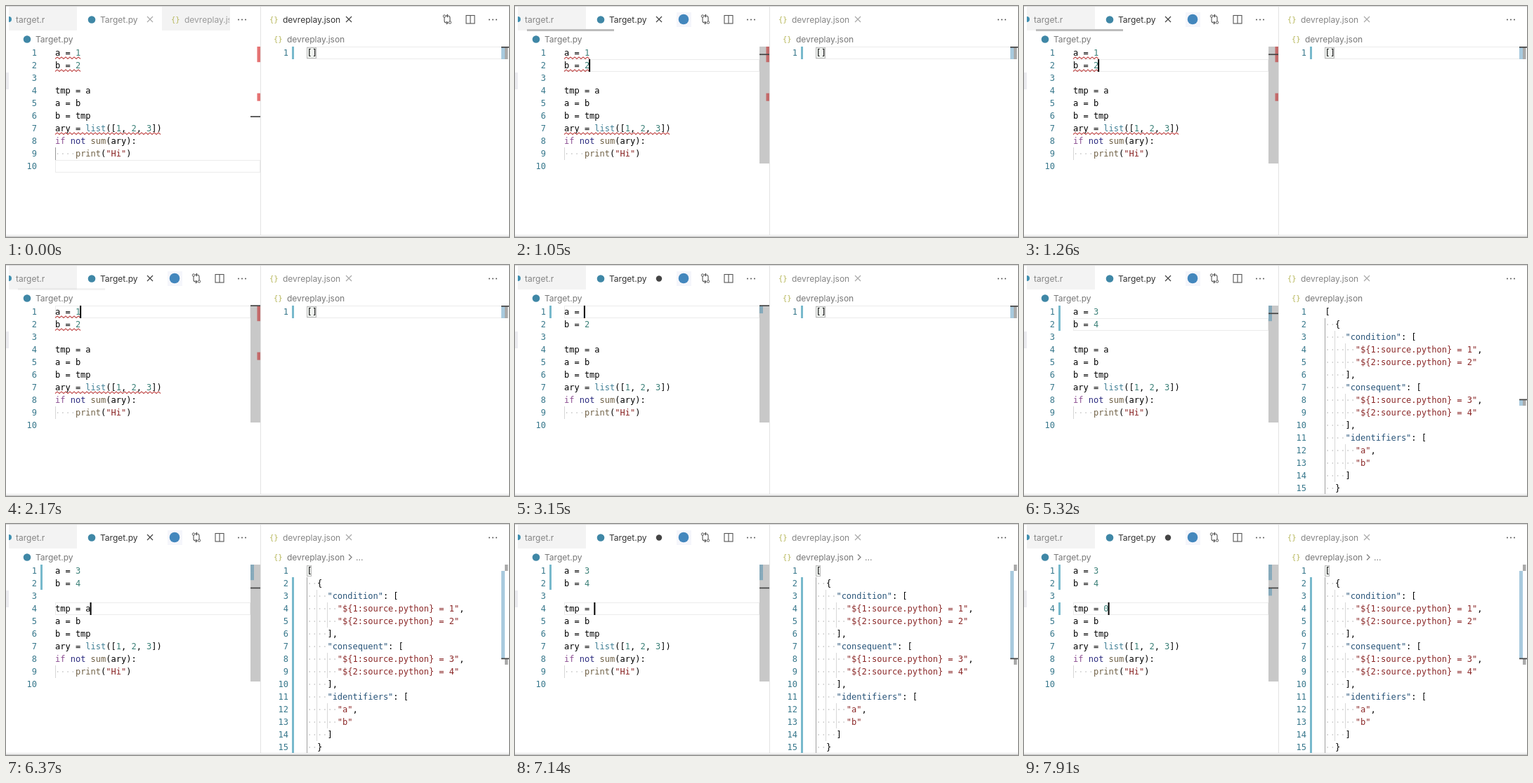
Write an HTML page that moves like this. It is 716 by 330 pixels and loops after 8 s.

```html
<!DOCTYPE html>
<html lang="en">
<head>
<meta charset="utf-8">
<title>Editor session</title>
<style>
  html, body { margin: 0; width: 100%; height: 100%; overflow: hidden; background: #fff; }
  svg { display: block; }
  text { white-space: pre; }
  .code { font: 12px "DejaVu Sans Mono", monospace; }
  .ui { font: 12px Inter, sans-serif; }
</style>
</head>
<body>
<svg id="stage" width="716" height="330" viewBox="0 0 716 330"></svg>
<script>
const LOOP = 8000, CHAR = 7.224, ROW = 18, TOP = 58;
const LEFT = 70, RIGHT = 428.5;
const DARK = '#333', DIM = '#858585', BAR = '#78b9cc', GUTTER = '#38788c';
const COLORS = { key: '#275378', str: '#8a2727', num: '#3b8078', ctl: '#8c4f92', op: '#2c2c80', type: '#3f7f95', fn: '#6f6045' };
const TOKEN = /(?<key>"[^"]*"(?=:))|(?<str>"[^"]*")|(?<num>\b\d+\b)|(?<ctl>\bif\b)|(?<op>\bnot\b)|(?<type>\blist\b)|(?<fn>\b(?:sum|print)\b)/g;

// Caret moves and edits in the left editor: time, line, column
const KEYS = [
  [980, 2, 5], [1890, 1, 5], [2660, 1, 4], [3500, 1, 5], [3710, 2, 5], [3990, 2, 4],
  [4340, 2, 5], [5740, 3, 0], [5880, 4, 5], [5950, 4, 6], [6020, 4, 7], [7070, 4, 6], [7490, 4, 7]
];

const JSON_LINES = [
  '[', '  {', '    "condition": [', '      "${1:source.python} = 1",', '      "${2:source.python} = 2"', '    ],',
  '    "consequent": [', '      "${1:source.python} = 3",', '      "${2:source.python} = 4"', '    ],',
  '    "identifiers": [', '      "a",', '      "b"', '    ]', '  }'
];

const rowY = n => TOP + (n - 1) * ROW;
const rect = (x, y, w, h, fill, extra = '') => `<rect x="${x}" y="${y}" width="${w}" height="${h}" fill="${fill}" ${extra}/>`;
const path = (d, color, width = 1) => `<path d="${d}" fill="none" stroke="${color}" stroke-width="${width}"/>`;
const disc = (x, y, r, fill) => `<circle cx="${x}" cy="${y}" r="${r}" fill="${fill}"/>`;
const label = (x, y, s, fill) => `<text class="ui" x="${x}" y="${y}" fill="${fill}">${s}</text>`;
const cross = (x, color) => path(`M${x - 4} 15l8 8m0-8l-8 8`, color, 1.2);
const dots = x => [-5, 0, 5].map(d => disc(x + d, 19.5, 1, '#555')).join('');
const braces = (x, y) => `<text class="code" x="${x}" y="${y}" fill="#b7b75a" font-weight="bold" style="font-size:10.5px">{}</text>`;
const lineBox = (x, y, w) => rect(x + .5, y + .5, w, ROW - 1, 'none', 'stroke="#ebebeb"');
const bracketBox = w => rect(428.5, TOP + 1.5, w, 15, '#f2f5f2', 'stroke="#b9b9b9"');
const between = (t, from, to) => t >= from && t < to;

function compareIcon(x) {
  const c = '#555';
  return path(`M${x - 4} 16v5q0 3 3 3h2m-2-2l2 2l-2 2M${x + 4} 22v-5q0-3-3-3h-2m2-2l-2 2l2 2`, c, 1.1) +
    `<g fill="#fff" stroke="${c}"><circle cx="${x - 4}" cy="14.5" r="1.7"/><circle cx="${x + 4}" cy="23.5" r="1.7"/></g>`;
}

function splitIcon(x) {
  return rect(x - 6, 13.5, 12, 11.5, 'none', 'stroke="#555" stroke-width="1.1"') + path(`M${x} 13v12`, '#555', 1.1);
}

function codeLine(x, n, s) {
  const indent = s.match(/^ */)[0].length;
  const body = s.slice(indent).replace(TOKEN, (m, ...rest) => {
    const groups = rest[rest.length - 1];
    const kind = Object.keys(groups).find(k => groups[k]);
    return `<tspan fill="${COLORS[kind]}">${m}</tspan>`;
  });
  return `<text class="code" x="${x}" y="${rowY(n) + 13}"><tspan fill="#cfcfcf">${'·'.repeat(indent)}</tspan>${body}</text>`;
}

function lineNumber(x, n) {
  return `<text class="code" x="${x}" y="${rowY(n) + 13}" text-anchor="end" fill="${GUTTER}">${n}</text>`;
}

function squiggle(n, chars) {
  const waves = Math.round(chars * CHAR / 6);
  return path(`M${LEFT} ${rowY(n) + 17.5}` + 'l3-2.6l3 2.6'.repeat(waves), '#c04a4a', 1.1);
}

function leftTabs(t, focused) {
  const dirty = between(t, 2660, 5180) || t >= 7070;
  let s = rect(4, 1, 97, 34, '#f3f3f3') + `<path d="M4 15a4 4 0 0 1 0 8z" fill="#3f8fb0"/>` + label(14, 23.5, 'target.r', DIM);
  s += disc(122, 19.5, 5.3, '#3f87a6') + label(134, 23.5, 'Target.py', focused ? DARK : DIM);
  s += dirty ? disc(205, 19.5, 4.2, '#444') : cross(205, focused ? '#444' : '#aaa');
  if (focused) {
    s += rect(230, 9, 21, 21, '#f5f6fb') + disc(240, 19, 7.3, '#4387bd') + compareIcon(271) + splitIcon(304);
    const fade = Math.max(0, Math.min(1, (2310 - t) / 700));
    if (fade) s += rect(17, 33, 124, 3, '#bdbdbd', `opacity="${fade.toFixed(2)}"`);
  } else {
    s += rect(222, 1, 97, 34, '#f3f3f3') + braces(235, 23);
    s += `<svg x="254" y="0" width="64" height="35">${label(0, 23.5, 'devreplay.json', '#9a9a9a')}</svg>`;
  }
  return s + dots(336) + disc(30, 47.5, 5.3, '#3f87a6') + label(42, 51.7, 'Target.py', '#777');
}

function leftRuler(t, focused, line, bars) {
  const y = n => TOP + (n - 1) * 11.1;
  let s = '';
  if (focused) s += rect(348, TOP, 14, 167, '#c8c8c8');
  if (t < 2800) s += [[1, 2], [7, 1]].map(([n, h]) => rect(357.5, y(n), 4.5, h * 11.1, focused ? '#c46a6a' : '#e57373')).join('');
  s += bars.map(n => rect(348, y(n), 5, 11.1, '#86aabb')).join('');
  return s + rect(348, y(line) - .7, 14, 1.7, '#444');
}

function leftPane(t) {
  const focused = t >= 980;
  const key = KEYS.filter(k => k[0] <= t).pop();
  const line = key ? key[1] : 10;
  const a = t < 2660 ? '1' : t < 3500 ? '' : '3';
  const b = t < 3990 ? '2' : t < 4340 ? '' : '4';
  const c = t < 7070 ? 'a' : t < 7490 ? '' : '0';
  const code = ['a = ' + a, 'b = ' + b, '', 'tmp = ' + c, 'a = b', 'b = tmp', 'ary = list([1, 2, 3])', 'if not sum(ary):', '    print("Hi")', ''];
  const bars = [[2800, 1], [4130, 2], [7350, 4]].filter(m => t >= m[0]).map(m => m[1]);

  let s = leftTabs(t, focused) + lineBox(LEFT, rowY(line), focused ? 277 : 291);
  s += rect(LEFT, rowY(9), 1, ROW, focused ? '#d6d6d6' : '#989898');
  code.forEach((text, i) => { s += lineNumber(44, i + 1) + codeLine(LEFT, i + 1, text); });
  if (t < 2800) s += squiggle(1, 5) + squiggle(2, 5) + squiggle(7, 21);
  s += bars.map(n => rect(49, rowY(n), 3, ROW, BAR)).join('') + leftRuler(t, focused, line, bars);
  if (key && Math.floor((t - key[0]) / 500) % 2 === 0) s += rect(LEFT + key[2] * CHAR - 1, rowY(line), 2, ROW, '#000');
  return s;
}

function rightPane(t) {
  const focused = t < 980, filled = t >= 5320, tracked = t >= 5530;
  let s = braces(375, 23) + label(394, 23.5, 'devreplay.json', focused ? DARK : DIM) + cross(488, focused ? '#444' : '#aaa') + dots(693);
  if (focused) s += compareIcon(628) + splitIcon(661);
  s += braces(381, 51) + label(400, 51.7, 'devreplay.json', '#777');
  if (t >= 5670) s += path('M488 43.5l4 4l-4 4', '#777', 1.1) + label(498, 51.7, '...', '#777');

  if (!filled) {
    s += lineBox(RIGHT - .5, TOP, 277) + bracketBox(13) + lineNumber(402, 1) + codeLine(RIGHT, 1, '[]');
    s += rect(407, TOP, 3, ROW, BAR);
    if (between(t, 70, 560)) s += rect(RIGHT + CHAR - 1, TOP, 2, ROW, '#000');
    return s + rect(705, TOP, 5, ROW, '#a8cade') + rect(710, TOP, 4.5, ROW, '#aaa') + rect(705, TOP, 11, 1.7, '#444');
  }

  if (t >= 5390) s += bracketBox(6);
  s += rect(428, rowY(2), 1, 252, '#a0a0a0') + rect(442, rowY(3), 1, 216, '#d8d8d8');
  s += [4, 8, 12].map(n => rect(457, rowY(n), 1, 36, '#d8d8d8')).join('');
  JSON_LINES.forEach((text, i) => { s += lineNumber(402, i + 1) + codeLine(RIGHT, i + 1, text); });
  if (tracked) s += rect(407, rowY(2), 3, 254, BAR) + rect(705, 67, 5, 125, '#a8cade') + rect(710, TOP, 4.5, 9, '#aaa');
  else s += rect(705, 192, 5, 9, '#a8cade');
  return s + rect(710, 192, 4.5, 9, '#aaa') + rect(705, 191.5, 11, 1.7, '#444');
}

function frame(t) {
  return rect(0, 0, 716, 330, '#fff') + rect(0, 95, 4, 24, '#ececf0') +
    leftPane(t) + rightPane(t) + rect(362, 1, 1, 327, '#e3e3e3') +
    rect(0, 0, 716, 1, '#d6d6d6') + rect(0, 327, 716, 3, '#fff') + rect(0, 327, 716, 1, '#e4e4e4') + rect(0, 329, 716, 1, '#bdbdbd');
}

const stage = document.getElementById('stage');
const start = performance.now();
let shown = '';

function tick() {
  const next = frame((performance.now() - start) % LOOP);
  if (next !== shown) stage.innerHTML = shown = next;
  requestAnimationFrame(tick);
}
tick();
</script>
</body>
</html>
```
